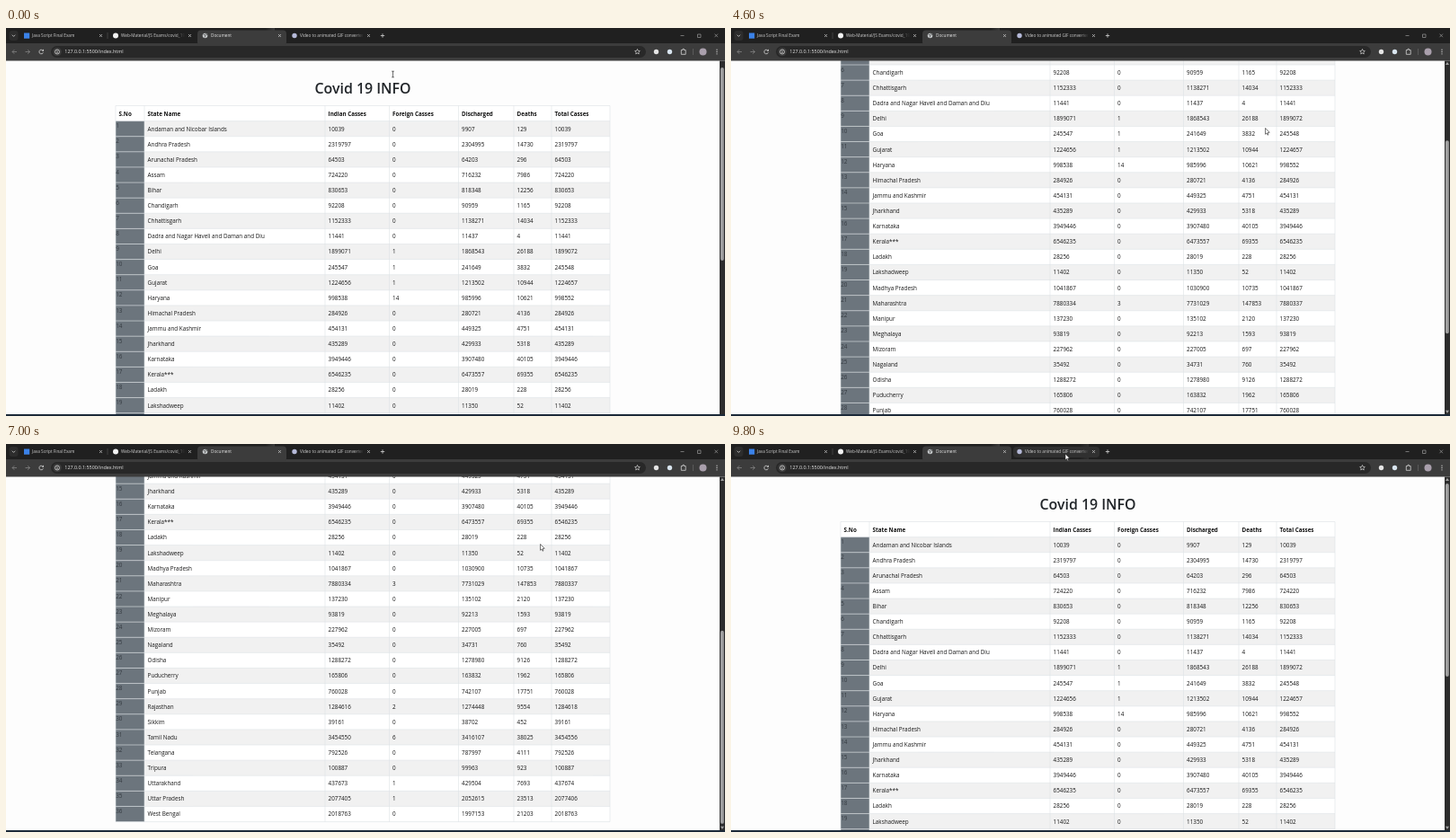
An HTML page with a canvas for the animation above (9900 ms loop, 800 by 432 pixels).

```html
<!DOCTYPE html>
<html lang="en">
<head>
<meta charset="utf-8">
<title>Covid 19 INFO</title>
<style>
html, body { margin: 0; width: 100%; height: 100%; overflow: hidden; background: #202020; }
canvas { display: block; width: 800px; height: 432px; }
</style>
</head>
<body>
<canvas id="stage" width="800" height="432"></canvas>
<script>
const ctx = document.getElementById('stage').getContext('2d');
const LOOP = 9900, STEP = 100;
const FONT = '"Open Sans", "Noto Sans", sans-serif';
const ROW = 17.11, TABLE_TOP = 86.5, PAGE_TOP = 36.5, PAGE_END = 430;
const MAX_SCROLL = 299;
const COLUMNS = [122, 154, 355, 426.5, 503.5, 565, 607, 672];
const HEADINGS = ['S.No', 'State Name', 'Indian Casses', 'Foreign Casses', 'Discharged', 'Deaths', 'Total Casses'];

// name | indian discharged deaths [foreign]
const STATES = `Andaman and Nicobar Islands|10039 9907 129
Andhra Pradesh|2319797 2304995 14730
Arunachal Pradesh|64503 64203 296
Assam|724220 716232 7986
Bihar|830653 818348 12256
Chandigarh|92208 90959 1165
Chhattisgarh|1152333 1138271 14034
Dadra and Nagar Haveli and Daman and Diu|11441 11437 4
Delhi|1899071 1868543 26188 1
Goa|245547 241649 3832 1
Gujarat|1224656 1213502 10944 1
Haryana|998538 985996 10621 14
Himachal Pradesh|284926 280721 4136
Jammu and Kashmir|454131 449325 4751
Jharkhand|435289 429933 5318
Karnataka|3949446 3907480 40105
Kerala***|6546235 6473557 69355
Ladakh|28256 28019 228
Lakshadweep|11402 11350 52
Madhya Pradesh|1041867 1030900 10735
Maharashtra|7880334 7731029 147853 3
Manipur|137230 135102 2120
Meghalaya|93819 92213 1593
Mizoram|227962 227005 697
Nagaland|35492 34731 760
Odisha|1288272 1278980 9126
Puducherry|165806 163832 1962
Punjab|760028 742107 17751
Rajasthan|1284616 1274448 9554 2
Sikkim|39161 38702 452
Tamil Nadu|3454550 3416107 38025 6
Telangana|792526 787997 4111
Tripura|100887 99963 923
Uttarakhand|437673 429504 7693 1
Uttar Pradesh|2077405 2052615 23513 1
West Bengal|2018763 1997153 21203`.split('\n').map(line => {
  const [name, figures] = line.split('|');
  const [indian, discharged, deaths, foreign = 0] = figures.split(' ').map(Number);
  return [name, indian, foreign, discharged, deaths, indian + foreign];
});

function rect(x, y, w, h, color) {
  ctx.fillStyle = color;
  ctx.fillRect(x, y, w, h);
}

function round(x, y, w, h, r, color) {
  ctx.fillStyle = color;
  ctx.beginPath();
  ctx.roundRect(x, y, w, h, r);
  ctx.fill();
}

function dot(x, y, r, color) {
  ctx.fillStyle = color;
  ctx.beginPath();
  ctx.arc(x, y, r, 0, Math.PI * 2);
  ctx.fill();
}

function text(str, x, y, size, color, weight = 400, align = 'left') {
  ctx.font = `${weight} ${size}px ${FONT}`;
  ctx.fillStyle = color;
  ctx.textAlign = align;
  ctx.fillText(str, x, y);
}

// Each path is a flat list of x, y pairs.
function stroke(color, width, ...paths) {
  ctx.strokeStyle = color;
  ctx.lineWidth = width;
  ctx.beginPath();
  for (const p of paths) {
    for (let i = 0; i < p.length; i += 2) ctx[i ? 'lineTo' : 'moveTo'](p[i], p[i + 1]);
  }
  ctx.stroke();
}

function ring(x, y, r, color, from = 0, to = Math.PI * 2) {
  ctx.strokeStyle = color;
  ctx.lineWidth = 0.8;
  ctx.beginPath();
  ctx.arc(x, y, r, from, to);
  ctx.stroke();
}

function polygon(points, color) {
  ctx.fillStyle = color;
  ctx.beginPath();
  for (let i = 0; i < points.length; i += 2) ctx.lineTo(points[i], points[i + 1]);
  ctx.closePath();
  ctx.fill();
}

const ease = k => k * k * (3 - 2 * k);
const progress = (t, from, to) => Math.min(1, Math.max(0, (t - from) / (to - from)));

function scrollAt(t) {
  return MAX_SCROLL * (progress(t, 4050, 5160) - progress(t, 7100, 8000));
}

function pointerAt(t) {
  const enter = ease(progress(t, 100, 1000));
  const leave = ease(progress(t, 9000, 9700));
  return {
    x: 430.5 + 164 * enter - 222.5 * leave,
    y: 51.5 + 60 * enter - 100.5 * leave
  };
}

function drawTable(scroll) {
  const left = COLUMNS[0], right = COLUMNS[7];
  const top = TABLE_TOP - scroll;
  const bottom = top + ROW * (STATES.length + 1);
  rect(left, top, right - left, bottom - top, '#ffffff');
  STATES.forEach((cells, i) => {
    const y = top + ROW * (i + 1);
    if (i % 2 === 0) rect(154, y, right - 154, ROW, '#f1f1f1');
    rect(left, y, 32, ROW, '#6c757d');
  });
  const lines = [];
  for (let i = 0; i <= STATES.length + 1; i++) {
    const y = top + ROW * i;
    lines.push([left, y, right, y]);
  }
  COLUMNS.forEach(x => lines.push([x, top, x, bottom]));
  stroke('#dee2e6', 0.6, ...lines);

  HEADINGS.forEach((label, i) => text(label, COLUMNS[i] + 3.6, top + 11.2, 6.25, '#111', 700));
  STATES.forEach((cells, i) => {
    const y = top + ROW * (i + 1);
    if (y < 15 || y > 432) return;
    text(String(i + 1), left + 0.2, y + 7.6, 6.3, '#343a40');
    cells.forEach((cell, c) => text(String(cell), COLUMNS[c + 1] + 3.6, y + 11, 6.3, '#161616'));
  });
}

function drawScrollbar(scroll, arrows) {
  rect(794, PAGE_TOP, 6, PAGE_END - PAGE_TOP, '#2c2c2c');
  round(795, 44 + scroll * 0.548, 3.8, 215, 1.9, '#9f9f9f');
  if (!arrows) return;
  polygon([795, 41, 799, 41, 797, 37.8], '#9f9f9f');
  polygon([795, 425.8, 799, 425.8, 797, 429], '#9f9f9f');
}

function drawTab(x, title, background, current) {
  ctx.save();
  ctx.beginPath();
  ctx.rect(x, 0, 85, 17);
  ctx.clip();
  text(title, x + 14, 10.3, 4.72, current ? '#e8e8e8' : '#d0d0d0');
  const fade = ctx.createLinearGradient(x + 75, 0, x + 85, 0);
  fade.addColorStop(0, background + '00');
  fade.addColorStop(1, background);
  rect(x + 75, 0, 10, 17, fade);
  ctx.restore();
  const c = x + 90.5;
  stroke('#d0d0d0', 0.7, [c - 1.5, 7, c + 1.5, 10], [c + 1.5, 7, c - 1.5, 10]);
}

function drawBrowser(hover) {
  const bar = '#202020', active = '#3c3c3c', lit = '#303030', ink = '#d5d5d5';
  rect(0, 0, 800, 17, bar);
  rect(0, 17, 800, PAGE_TOP - 17, active);
  round(3.5, 3, 10, 11, 3, '#2d2d2d');
  stroke(ink, 0.8, [6.8, 7.7, 8.5, 9.4, 10.2, 7.7]);

  round(213, 2.5, 99, 17, 4, active);
  if (hover) round(314, 3, 96, 12, 4, lit);
  drawTab(15, 'Java Script Final Exam', bar);
  drawTab(114, 'Web-Material/JS Exams/covid_19', bar);
  drawTab(214, 'Document', active, true);
  drawTab(313, 'Video to animated GIF converter', hover ? lit : bar);
  rect(20, 5.5, 6.2, 6.2, '#3b82e8');
  dot(122, 8.5, 3, '#f2f2f2');
  dot(221.5, 8.5, 2.8, '#c4c7c9');
  stroke(active, 0.7, [219.5, 7, 222, 8, 221, 10.5], [222, 6.3, 224, 8]);
  dot(321, 8.5, 2.7, '#b5b9d8');
  stroke('#606060', 0.5, [113, 5, 113, 12]);
  stroke(ink, 0.8, [416.8, 8.5, 421.2, 8.5], [419, 6.3, 419, 10.7]);

  stroke('#9a9a9a', 0.7, [750.5, 8.5, 754.5, 8.5],
    [769.5, 7, 773, 7, 773, 10.5, 769.5, 10.5, 769.5, 7],
    [788.5, 6.6, 792, 10.2], [792, 6.6, 788.5, 10.2]);

  stroke('#858585', 0.8, [12, 26.5, 7, 26.5], [9.3, 24.2, 7, 26.5, 9.3, 28.8],
    [21.5, 26.5, 26.5, 26.5], [24.2, 24.2, 26.5, 26.5, 24.2, 28.8]);
  ring(39.2, 26.5, 2.3, ink, 0.3, 5.5);
  polygon([39.8, 25.7, 42, 25.7, 42, 23.5], ink);

  round(50, 20, 662, 13, 6.5, '#282828');
  dot(57, 26.5, 4.8, '#3c3c3c');
  ring(57, 26.5, 2.5, ink);
  stroke(ink, 0.8, [57, 26, 57, 28], [57, 24.8, 57, 25.4]);
  text('127.0.0.1:5500/index.html', 65.3, 28.4, 5.4, '#e8e8e8');

  const star = [];
  for (let i = 0; i <= 10; i++) {
    const a = -Math.PI / 2 + i * Math.PI / 5, r = i % 2 ? 1.4 : 3;
    star.push(702.5 + r * Math.cos(a), 26.5 + r * Math.sin(a));
  }
  stroke(ink, 0.7, star);
  dot(723.5, 26.5, 2.7, '#e4e4e4');
  dot(738.5, 26.5, 2.7, '#d8e4ee');
  stroke(ink, 0.8, [751.3, 24.5, 753, 24.5, 753, 23.3, 754.4, 23.3, 754.4, 24.5,
    756.2, 24.5, 756.2, 29.3, 751.3, 29.3, 751.3, 24.5]);
  stroke('#707070', 0.6, [764.5, 23, 764.5, 30]);
  dot(775.5, 26.5, 4, '#a99fac');
  [24.2, 26.5, 28.8].forEach(y => dot(791, y, 0.65, ink));
}

function drawPointer({ x, y }, beam) {
  if (beam) {
    stroke('#333', 0.7, [x - 1.4, y - 3.3, x + 1.4, y - 3.3], [x, y - 3.3, x, y + 3.3],
      [x - 1.4, y + 3.3, x + 1.4, y + 3.3]);
    return;
  }
  const shape = [0, 0, 0, 6.8, 1.5, 5.4, 2.5, 7.7, 3.5, 7.2, 2.6, 5, 4.7, 4.8, 0, 0]
    .map((v, i) => v + (i % 2 ? y : x));
  polygon(shape, '#ffffff');
  stroke('#222', 0.6, shape);
}

function draw(t) {
  const scroll = scrollAt(t), pointer = pointerAt(t);
  rect(0, 0, 800, 432, '#fdfdfd');
  text('Covid 19 INFO', 397, 73 - scroll, 15.9, '#212529', 600, 'center');
  drawTable(scroll);
  rect(0, PAGE_END, 800, 2, '#1b2938');
  drawScrollbar(scroll, t >= 4100);
  drawBrowser(pointer.y < 17);
  drawPointer(pointer, t < 200);
}

function tick(now) {
  draw(Math.floor((now % LOOP) / STEP) * STEP);
  requestAnimationFrame(tick);
}
requestAnimationFrame(tick);
</script>
</body>
</html>
```
